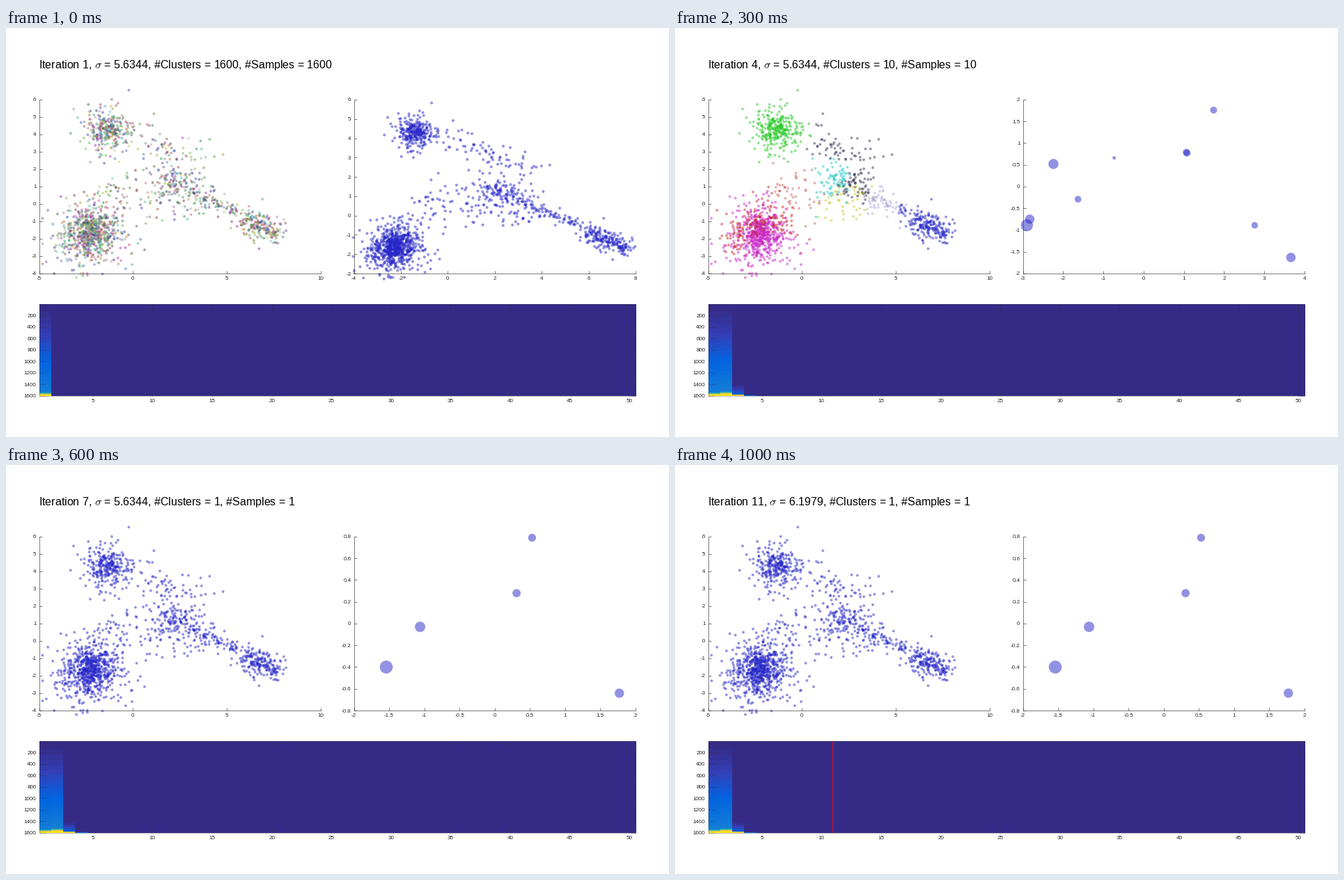
A matplotlib script for the animation above (1.1 s loop, 952 by 588 pixels).

```python
import numpy as np
import matplotlib.pyplot as plt
from matplotlib.animation import FuncAnimation
from matplotlib.colors import LinearSegmentedColormap

W, H, DPI = 952, 588, 64
PT = 72 / DPI  # points per pixel
INK = (0.15, 0.15, 0.15)

plt.rcParams.update({
    "font.family": "Liberation Sans",
    "mathtext.fontset": "cm",
    "axes.unicode_minus": False,
})

LO, HI = 0.15, 0.79
INKS = {
    "b": (LO, LO, HI), "r": (HI, LO, LO), "g": (LO, HI, LO),
    "m": (HI, LO, HI), "c": (LO, HI, HI), "y": (HI, HI, LO),
    "d": (0.2, 0.2, 0.33),    # slate
    "l": (0.68, 0.68, 0.84),  # lavender
    "n": (0.8, 0.42, 0.38),   # salmon
    "t": (0.45, 0.7, 0.7),    # teal
    "s": (LO, 0.38, 0.72),    # steel
    "p": (0.5, 0.2, 0.4),     # plum
    "k": (0.74, 0.74, 0.74),  # grey
    "o": (0.72, 0.75, 0.28),  # olive
}

PARULA = LinearSegmentedColormap.from_list("parula", [
    (0.00, (0.21, 0.17, 0.53)), (0.08, (0.20, 0.25, 0.72)),
    (0.17, (0.01, 0.39, 0.88)), (0.30, (0.08, 0.50, 0.84)),
    (0.42, (0.02, 0.64, 0.79)), (0.56, (0.22, 0.73, 0.62)),
    (0.76, (0.75, 0.74, 0.39)), (0.90, (0.99, 0.77, 0.22)),
    (1.00, (0.98, 0.98, 0.05)),
], N=64)

COUNTS = [1600, 287, 35, 10, 5, 2] + [1] * 5
rng = np.random.default_rng(7)


def strands(*parts, pull=1.0):
    """Points scattered round segments, each with a core and a halo."""
    groups, pulled = [], []
    for n, x0, y0, x1, y1, spread in parts:
        core = np.linspace((x0, y0), (x1, y1), n)
        off = rng.normal(0, spread, (n, 2)) * rng.uniform(0.4, 1.4, (n, 1))
        groups.append(core + off)
        pulled.append(core + pull * off)
    return np.vstack(groups), np.vstack(pulled)


def sized(xy, low, high, skew=1):
    return np.column_stack([xy, low + (high - low) * rng.random(len(xy)) ** skew])


points, pulled = strands(
    (740, -2.5, -1.8, -2.0, -1.3, 0.9),
    (280, -1.6, 4.45, -1.2, 4.2, 0.66),
    (130, 1.4, 1.4, 3.3, 0.8, 0.5),
    (70, 3.4, 0.5, 5.6, -0.4, 0.26),
    (200, 5.8, -0.75, 7.7, -1.75, 0.42),
    (80, 0.2, 4.2, 3.6, 2.1, 0.7),
    (100, -1.2, 0.8, 3.5, 0.1, 0.8),
    pull=0.66)
mix = rng.permutation(len(points))
points, pulled = points[mix], pulled[mix]

second, _ = strands(
    (130, -3.7, -1.45, -1.9, -0.8, 0.22),
    (35, -1.85, 4.6, -0.4, 4.0, 0.18),
    (35, 2.4, 1.5, 3.1, 0.8, 0.35),
    (32, 3.4, -0.1, 4.9, -0.4, 0.22),
    (35, 3.7, -0.5, 5.25, -3.1, 0.15),
    (20, -1.4, -0.3, 2.4, 1.8, 0.9))
third, _ = strands(
    (20, -3.6, 0.08, -1.3, 0.2, 0.2),
    (5, 2.93, 1.9, 4.8, 4.58, 0.15),
    (5, 3.1, -2.8, 3.9, -4.0, 0.1),
    (4, 1.75, 0.35, 2.2, -0.9, 0.1),
    (2, -0.22, 0.22, 0.36, 0.3, 0.0))

# x, y and diameter in pixels
fourth = np.array([
    (1.74, 1.76, 10), (1.06, 0.79, 10), (1.08, 0.77, 10), (-0.73, 0.66, 5),
    (-2.24, 0.52, 14.5), (-1.63, -0.29, 9.6), (-2.83, -0.75, 13.5),
    (-2.9, -0.89, 17.4), (2.76, -0.89, 9.4), (3.66, -1.63, 13.6),
])
fifth = np.array([
    (0.53, 0.79, 11.4), (0.31, 0.28, 11.8), (-1.06, -0.03, 15),
    (-1.54, -0.4, 18.6), (1.77, -0.64, 13.4),
])

# dots, x range and step, y range and step
VIEWS = [
    (sized(pulled, 4, 4), (-4, 8, 2), (-3, 6, 1)),
    (sized(second, 3.4, 8, 2), (-4, 6, 1), (-4, 5, 1)),
    (sized(third, 3.5, 13, 1.4), (-4, 5, 1), (-5, 5, 1)),
    (fourth, (-3, 4, 1), (-2, 2, 0.5)),
    (fifth, (-2, 2, 0.5), (-0.8, 0.8, 0.2)),
]

SITES = np.array([
    (-1.3, 4.3), (2.2, 3.3),                           # top, bridge
    (1.7, 1.2), (3.0, 1.1), (2.4, 0.0),                # middle
    (4.5, 0.0), (6.0, -0.6), (7.4, -1.6),              # tail
    (-2.9, -1.1), (-2.0, -1.9), (-1.6, -0.7), (-0.2, 0.7),  # blob
])


def nearest(xy, centres, noise=0.0):
    dist = ((xy[:, None] - centres) ** 2).sum(2)
    return np.argmin(dist - noise * rng.gumbel(size=dist.shape), axis=1)


def paint(words, noise=0.5):
    """One word per site; its letters are the colours mixed there."""
    words = words.split()
    return np.array([INKS[rng.choice(list(words[k]))]
                     for k in nearest(points, SITES, noise)])


def speckle(n):
    """Small groups, each with its own random tint."""
    centres = points[rng.choice(len(points), n, replace=False)]
    near = points + rng.normal(0, 0.4, points.shape)
    return (0.2 + 0.62 * rng.random((n, 3)))[nearest(near, centres)]


COLOURS = [
    LO + 0.67 * rng.random((len(points), 3)),
    speckle(COUNTS[1]),
    paint("cccyg tg s ts pt k b o mmk msk rs rp"),
    paint("g d c d y l b b rm m mr n"),
    paint("g d r r r r b b m m m m"),
    paint("r r r r r r b b r r r r", 0.2),
    paint("b " * len(SITES)),
]

ROWS = 132
row = (np.arange(ROWS) + 0.5) * 1600 / ROWS


def profile(start, ramp, knee, width, top):
    """Slow rise from start, then a jump to top around the knee."""
    rise = np.clip((row - start) / (1600 - start), 0, 1) ** 1.2
    jump = np.clip((row - knee) / width, 0, 1)
    return ramp * rise + (top - ramp) * jump


heat_map = np.zeros((ROWS, 50))
heat_map[:, :4] = np.column_stack([
    profile(0, 0.31, 1535, 45, 0.96),
    profile(0, 0.32, 1520, 45, 0.96),
    profile(1390, 0.2, 1575, 8, 0.94),
    profile(1586, 0.36, 1586, 3, 0.4),
])

fig = plt.figure(figsize=(W / DPI, H / DPI), dpi=DPI, facecolor="white")


def axes_at(x, y, w, h, tick, line=INK):
    ax = fig.add_axes([x / W, 1 - (y + h) / H, w / W, h / H])
    ax.set_facecolor("none")
    for side in ax.spines.values():
        side.set(linewidth=0.6 * PT, color=line)
    ax.tick_params(direction="in", length=tick * PT, width=0.6 * PT, pad=4 * PT,
                   color=line, labelcolor=INK, labelsize=8 * PT)
    return ax


def scale(ax, xs, ys):
    for axis, limit, (lo, hi, step) in ((ax.xaxis, ax.set_xlim, xs),
                                        (ax.yaxis, ax.set_ylim, ys)):
        marks = np.round(np.arange(lo, hi + step / 2, step), 2) + 0.0
        axis.set_ticks(marks, [f"{m:g}" for m in marks])
        limit(lo, hi)


def dots(ax, xy, size, colour):
    return ax.scatter(xy[:, 0], xy[:, 1], s=(size * PT) ** 2, c=colour,
                      alpha=0.5, linewidths=0, clip_on=False)


left = axes_at(47.5, 103, 404.5, 250, 4)
right = axes_at(499.5, 103, 404.5, 250, 4)
for ax in (left, right):
    ax.spines[["top", "right"]].set_visible(False)
scale(left, (-5, 10, 5), (-4, 6, 1))
samples = dots(left, points, 3.8, COLOURS[0])
centres = dots(right, pulled, 4.0, [INKS["b"]])

strip = axes_at(47.5, 397, 856.5, 132, 8.5, (*INK, 0.5))
image = strip.imshow(heat_map, cmap=PARULA, vmin=0, vmax=1, aspect="auto",
                     interpolation="nearest", extent=(0.5, 50.5, 1600.5, 0.5))
strip.set_xticks(range(5, 51, 5))
strip.set_yticks(range(200, 1601, 200))
strip.tick_params(top=True, right=True)
strip.set_axisbelow(False)
marker = strip.axvline(11, color=(0.74, 0.05, 0.18), linewidth=2 * PT)

title = fig.text(47.4 / W, 1 - 57.8 / H, "", fontsize=16 * PT, color="black",
                 ha="left", va="baseline")


def update(i):
    n = COUNTS[i]
    sigma = 5.63445 * (1.1 if i == 10 else 1)
    title.set_text(rf"Iteration {i + 1}, $\sigma$ = {sigma - 4e-5:.4f}, "
                   rf"#Clusters = {n}, #Samples = {n}")
    samples.set_facecolor(COLOURS[min(i, len(COLOURS) - 1)])

    data, xs, ys = VIEWS[min(i, len(VIEWS) - 1)]
    scale(right, xs, ys)
    centres.set_offsets(data[:, :2])
    centres.set_sizes((data[:, 2] * PT) ** 2)

    image.set_data(np.where(np.arange(50) <= i, heat_map, 0))
    marker.set_visible(i == 10)
    return samples, centres, image, marker, title


anim = FuncAnimation(fig, update, frames=len(COUNTS), interval=100,
                     repeat=True, repeat_delay=0, blit=False)
plt.show()
```
